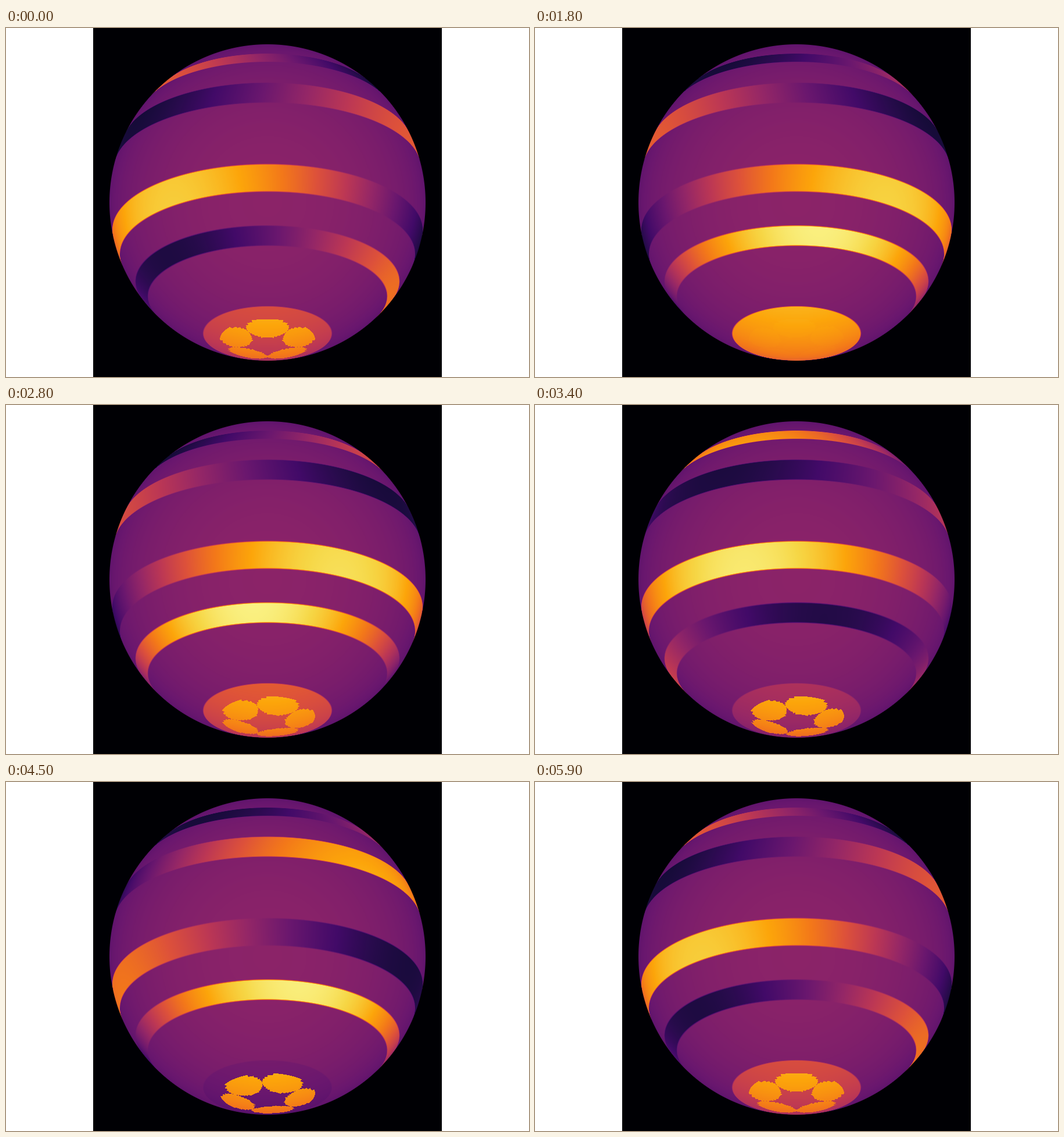
Write an HTML page with a canvas that moves like this. It is 900 px wide and 600 px high and loops after 6 s.

```html
<!DOCTYPE html>
<html lang="en">
<head>
<meta charset="utf-8">
<title>Banded sphere</title>
<style>
  html, body { margin: 0; width: 100%; height: 100%; overflow: hidden; background: #fff; }
  canvas { display: block; position: absolute; left: 150px; top: 0; }
</style>
</head>
<body>
<canvas id="stage" width="600" height="600"></canvas>
<script>
const SIZE = 600, RADIUS = 272, DEG = Math.PI / 180, TILT = 25 * DEG;
const STEP_MS = 100, STEPS = 60;
const SURFACE = 0.38, LIMB = 0.3;          // base brightness, limb darkening
const WAVE_MEAN = 0.55, WAVE_AMP = 0.42;
const CAP_LAT = -66, SPOT = { lat: -78, halfLat: 6, halfLon: 36, value: 0.9 };
const EDGE = 0.5;                          // softness of band edges in degrees

// Latitude range, longitude of the crest at the start, turns per loop
const bands = [
  { lo: 37.8, hi: 45.2, crest: -103, turns: -24 },
  { lo: 14.2, hi: 24.2, crest: 120, turns: -12 },
  { lo: -21, hi: -11, crest: -63, turns: -12 },
  { lo: -40.8, hi: -33.4, crest: 131, turns: -24 }
];

const clamp = v => Math.max(0, Math.min(1, v));

// Colour ramp from black through purple and orange to pale yellow
const stops = ['000004', '160b39', '420a68', '6a176e', '932667', 'bc3754',
  'dd513a', 'f37819', 'fca50a', 'f6d746', 'fcffa4']
  .map(hex => [0, 2, 4].map(i => parseInt(hex.slice(i, i + 2), 16)));
const LEVELS = 1000;
const ramp = Array.from({ length: LEVELS + 1 }, (_, n) => {
  const pos = n / LEVELS * 10, i = Math.min(9, Math.floor(pos));
  return stops[i].map((c, k) => c + (stops[i + 1][k] - c) * (pos - i));
});

const ctx = document.getElementById('stage').getContext('2d');
const image = ctx.createImageData(SIZE, SIZE);

function paint(index, value, cover) {
  const rgb = ramp[Math.round(clamp(value) * LEVELS)];
  for (let k = 0; k < 3; k++) {
    image.data[index * 4 + k] = stops[0][k] + (rgb[k] - stops[0][k]) * cover;
  }
  image.data[index * 4 + 3] = 255;
}

// Paint the still surface once and collect the pixels that change
const active = [];
for (let index = 0; index < SIZE * SIZE; index++) {
  const px = index % SIZE + 0.5 - SIZE / 2;
  const py = SIZE / 2 - Math.floor(index / SIZE) - 0.5;
  const r = Math.hypot(px, py), cover = clamp(RADIUS - r + 0.5);
  if (!cover) { paint(index, 0, 1); continue; }

  const x = px / RADIUS, y = py / RADIUS, z = Math.sqrt(Math.max(0, 1 - x * x - y * y));
  const sinLat = y * Math.cos(TILT) - z * Math.sin(TILT);
  const lat = Math.asin(Math.max(-1, Math.min(1, sinLat))) / DEG;
  const lon = Math.atan2(x, y * Math.sin(TILT) + z * Math.cos(TILT)) / DEG;
  const light = 1 - LIMB * (1 - z);
  paint(index, SURFACE * light, cover);

  const add = (weight, band) => {
    if (weight > 0) active.push({ index, lat, lon, light, cover, weight, band });
  };
  add(clamp((CAP_LAT - lat) / EDGE + 0.5), -1);
  bands.forEach((b, i) =>
    add(clamp((lat - b.lo) / EDGE + 0.5) * clamp((b.hi - lat) / EDGE + 0.5), i));
}

function inSpot(lat, lon) {
  const dLat = (Math.round(lat) - SPOT.lat) / SPOT.halfLat;
  const dLon = ((lon + 36) % 72 + 72) % 72 - 36;
  return dLat * dLat + (dLon / SPOT.halfLon) ** 2 < 1;
}

function draw(phase) {
  const cap = 0.63 + 0.28 * Math.sin(2 * Math.PI * phase);
  const spin = -720 * phase;
  const crests = bands.map(b => b.crest + 360 * b.turns * phase);
  for (const p of active) {
    let value;
    if (p.band >= 0) value = WAVE_MEAN + WAVE_AMP * Math.cos((p.lon - crests[p.band]) * DEG);
    else value = inSpot(p.lat, p.lon - spin) ? SPOT.value : cap;
    paint(p.index, (SURFACE + (value - SURFACE) * p.weight) * p.light, p.cover);
  }
  ctx.putImageData(image, 0, 0);
}

const start = performance.now();
let shown = -1;
function tick() {
  const step = Math.floor((performance.now() - start) / STEP_MS) % STEPS;
  if (step !== shown) draw((shown = step) / (STEPS - 1));
  requestAnimationFrame(tick);
}
tick();
</script>
</body>
</html>
```
